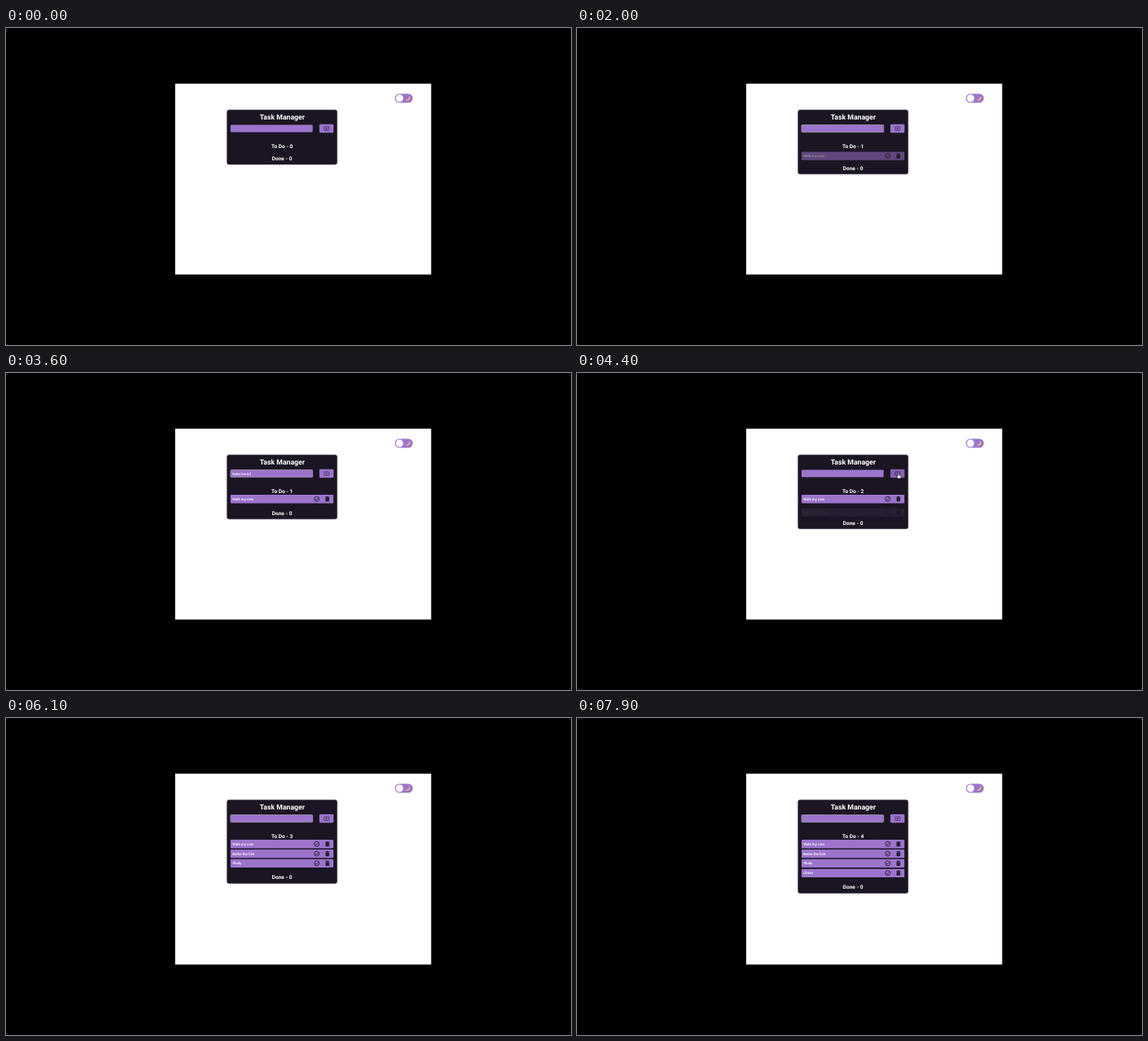
An HTML page for the animation above (8 s loop, 692x388 px).

```html
<!DOCTYPE html>
<html lang="en">
<head>
<meta charset="utf-8">
<title>Task Manager</title>
<style>
html, body { margin: 0; width: 100%; height: 100%; overflow: hidden; background: #000; }
svg { display: block; width: 692px; height: 388px; }
text { font-family: Roboto, Arial, sans-serif; fill: #fff; text-rendering: geometricPrecision; }
.head { font-weight: 700; font-size: 6.5px; text-anchor: middle; }
.title { font-size: 8.7px; }
.label { font-weight: 500; font-size: 4.4px; }
.typed { font-weight: 500; font-size: 3.9px; }
.purple { fill: #9c74cc; }
.line { fill: none; stroke: #1b1523; stroke-width: .8; }
.thin { stroke-width: .55; }
.dark { fill: #1b1523; }
</style>
</head>
<body>
<svg viewBox="0 0 692 388">
  <defs>
    <g id="row">
      <rect class="purple" x="275" y="149.1" width="126" height="10.3" rx="1"/>
      <circle class="line" cx="380.6" cy="154.2" r="3"/>
      <path class="line" d="M379 154.2l1.2 1.3 2.2-2.5"/>
      <path class="dark" d="M391.2 151.6h1.3l.4-.6h1.4l.4.6h1.3v.8h-4.8zM391.4 152.8h4.4v3.7q0 .8-.8.8h-2.8q-.8 0-.8-.8z"/>
      <path d="M392.9 153.8v2.4M394.3 153.8v2.4" stroke="#5d4679" stroke-width=".4"/>
    </g>
  </defs>
  <rect width="692" height="388"/>
  <rect x="207.2" y="68.2" width="313.5" height="233.5" fill="#fff"/>

  <rect class="purple" x="476.3" y="80.5" width="21.9" height="11" rx="5.5"/>
  <circle cx="482" cy="86" r="4.5" fill="#fff"/>
  <path d="M493.6 82.9a3.2 3.2 0 1 1-4.2 4.8a3.6 3.6 0 0 0 4.2-4.8z" fill="#f3c766"/>

  <rect id="card" class="dark" x="270.7" y="100.2" width="134.8" rx="2.5" stroke="#3a2b4d" stroke-width=".5"/>
  <text class="head title" x="338.3" y="112">Task Manager</text>
  <rect id="field" class="purple" x="275" y="118.5" width="100.6" height="9.1" rx="1"/>
  <text id="typed" class="typed" x="277.2" y="124.5"></text>
  <rect id="caret" y="121" width=".6" height="4.2" fill="#fff" opacity=".8"/>
  <rect id="button" x="383.8" y="117.8" width="17.4" height="10.5" rx="1.2"/>
  <rect class="line thin" x="389.7" y="120.9" width="5.8" height="4.5" rx=".6"/>
  <path class="line thin" d="M392.6 121.9v2.6M391.3 123.2h2.6"/>
  <text id="todo" class="head" x="338.1" y="146.8"></text>
  <g id="list"></g>
  <text id="done" class="head" x="338.1">Done - 0</text>
  <path id="hand" transform="translate(393.7 123.2)" d="M-.6 0q0-.7.6-.7t.6.7v2l1.8.5q.7.2.6 1l-.4 2.4h-3l-1.7-2.5q.1-.7.8-.3l.7.6z" fill="#fff" stroke="#111" stroke-width=".4"/>
</svg>
<script>
const LOOP = 8000, STEP = 100, FADE = 300, BLINK = 200, PITCH = 11.85;
const FOCUS = 500, BLUR = 4300, REFOCUS = 4700;
const $ = id => document.getElementById(id);
const show = (el, on) => { el.style.display = on ? "" : "none"; };
const easeOut = x => 1 - (1 - Math.min(1, Math.max(0, x))) ** 2;

const tasks = [
  { label: "Walk my cats", from: 900, to: 1700, added: 1905 },
  { label: "Bathe the fish", from: 2600, to: 3700, added: 4385 },
  { label: "Study", from: 5100, to: 5500, added: 5690 },
  { label: "Chess", from: 6700, to: 7200, added: 7390 }
];

for (const task of tasks) {
  task.row = document.createElementNS("http://www.w3.org/2000/svg", "g");
  task.row.innerHTML = `<use href="#row"/><text class="label" x="277.2" y="155.7">${task.label}</text>`;
  $("list").append(task.row);
}

// Text in the field, typed at an even pace.
function typedText(task, t) {
  if (!task || t < task.from) return "";
  const part = (t - task.from + STEP) / (task.to - task.from + STEP);
  return task.label.slice(0, Math.ceil(task.label.length * part));
}

function draw(t) {
  tasks.forEach(({ row, added }, i) => {
    const p = easeOut((t - added) / FADE);
    show(row, t >= added);
    row.setAttribute("opacity", p);
    row.setAttribute("transform", `translate(0 ${i * PITCH + 5 * (1 - p)})`);
  });

  const count = tasks.filter(task => t >= task.added).length;
  $("todo").textContent = "To Do - " + count;
  $("done").setAttribute("y", 161.8 + count * PITCH);
  $("card").setAttribute("height", 66.8 + count * PITCH);

  const text = typedText(tasks[count], t);
  $("typed").textContent = text;

  // The caret stays on beside text and blinks in an empty field.
  const focused = t >= FOCUS && (t < BLUR || t >= REFOCUS);
  const resets = [FOCUS, REFOCUS, ...tasks.map(task => task.added)];
  const idle = t - Math.max(...resets.filter(at => at <= t));
  show($("caret"), focused && (text || Math.floor(idle / BLINK) % 2));
  $("caret").setAttribute("x", 277.2 + (text ? $("typed").getComputedTextLength() : 0));
  $("field").setAttribute("stroke", focused ? "#8d8496" : "none");

  const hover = t >= BLUR - BLINK && t < REFOCUS - STEP;
  $("button").setAttribute("fill", hover ? "#8562b0" : "#9c74cc");
  show($("hand"), hover);
}

const start = performance.now();
function frame() {
  const t = (performance.now() - start) % LOOP;
  draw(Math.floor(t / STEP) * STEP);
  requestAnimationFrame(frame);
}
frame();
</script>
</body>
</html>
```
